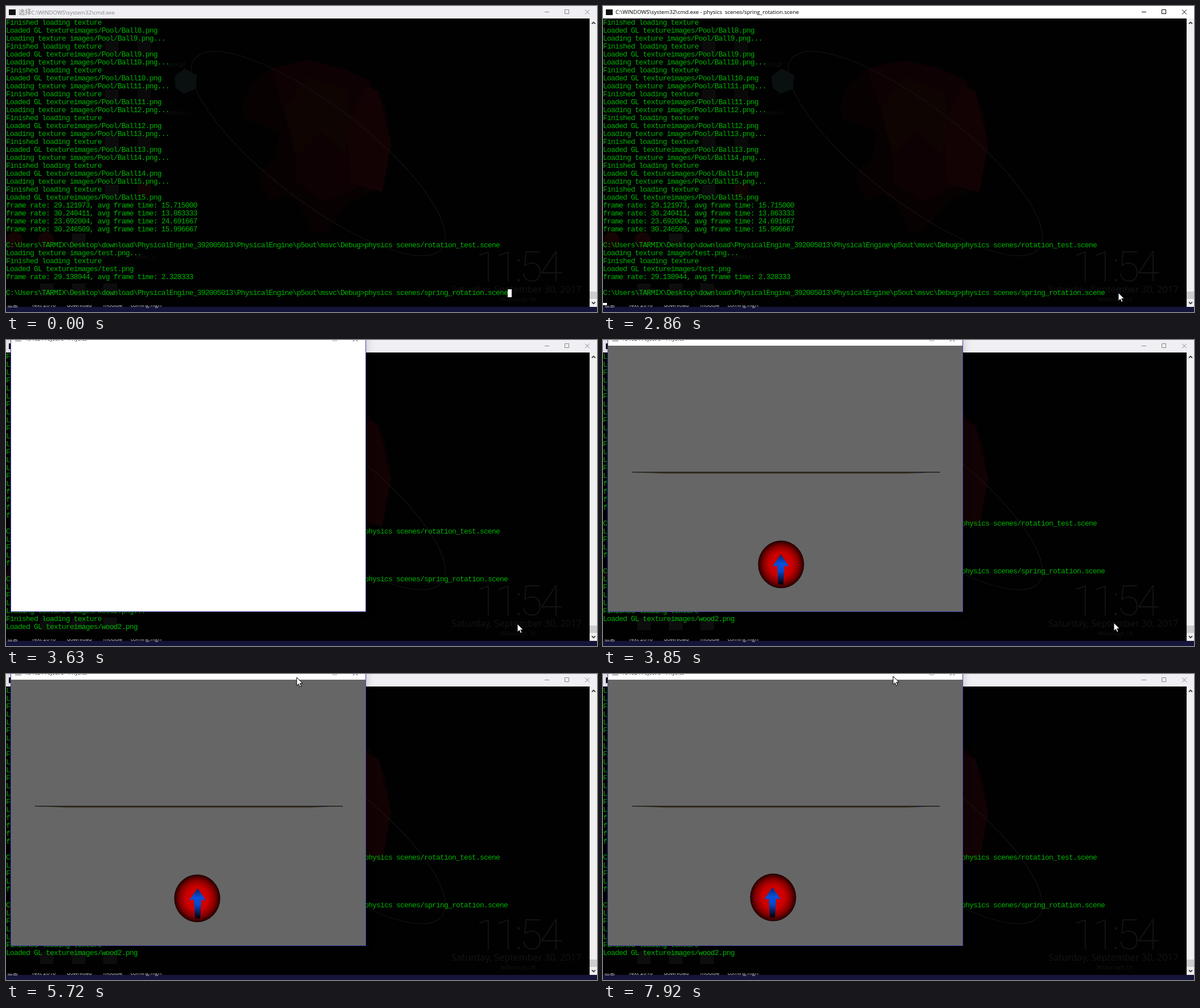
Animation, 1039 px wide and 539 px high, one loop 8 s. Source, as an HTML page:

```html
<!DOCTYPE html>
<html lang="en">
<head>
<meta charset="utf-8">
<title>Terminal and physics window</title>
<style>
  html, body { margin: 0; width: 100%; height: 100%; overflow: hidden; background: #15143a; }
  #stage { position: relative; width: 1039px; height: 539px; overflow: hidden; background: #15143a; }
  #stage > * { position: absolute; }
  svg { display: block; overflow: hidden; }
  #wall { left: 0; top: 22px; background: #010102; }
  #bar { left: 0; top: 0; width: 1039px; height: 22px; background: #f0eff4; color: #858585; }
  #bar.active { background: #fff; color: #000; }
  #bar > * { position: absolute; }
  #icon { left: 5px; top: 6px; width: 12px; height: 10px; background: #111; }
  #title { left: 22px; top: 0; white-space: pre;
    font: 9.6px/22px "Open Sans", "Noto Sans CJK SC", "Noto Sans CJK", sans-serif; }
  #title b { font-weight: 400; font-size: 11.3px; }
  #text { left: 0; top: 23px; margin: 0; width: 1026px; height: 504px; overflow: hidden; color: #00b400;
    font: 13px/14px "Liberation Mono", monospace; letter-spacing: calc(7px - 1ch); }
  #caret, #mark { background: #fff; width: 7px; }
  #caret { height: 4px; }
  #mark { left: 882px; top: 499px; height: 14px; }
  #labels { left: 0; top: 527px; width: 400px; height: 8px; overflow: hidden; color: #d8d8dc;
    font: 9.5px/12px "Open Sans", "Noto Sans CJK SC", "Noto Sans CJK", sans-serif; }
  #labels span { position: absolute; top: -6px; white-space: pre; }
  #win { left: 8px; top: -14px; width: 623px; height: 491px; border: 1px solid #4545a8;
    background: #fff; box-shadow: 0 0 14px rgba(0, 0, 0, .22); }
  #win > * { position: absolute; }
  #name { left: 24px; top: 3px; color: #222; white-space: pre; font: 9.6px/16px "Open Sans", sans-serif; }
  #view { left: 0; top: 23px; background: #666; }
</style>
</head>
<body>
<div id="stage">
  <svg id="wall" width="1026" height="508" viewBox="0 22 1026 508">
    <path fill="#080102" d="M415 178 430 140 465 110 530 95 592 110 640 132 668 180 677 245 665 318 606 345 562 398 540 400 515 350 490 330 465 346 440 300 472 270 482 222 422 200Z"/>
    <path fill="#0d0103" d="M465 110 530 95 592 110 640 132 632 312 560 345 510 310 510 264 488 182Z"/>
    <path fill="#130204" d="M632 140 655 150 677 245 661 328 606 312 598 210Z"/>
    <path fill="#0e0402" d="M488 182 530 125 600 150 606 205 596 262 553 222 510 264Z"/>
    <ellipse cx="549" cy="260" rx="274" ry="85" transform="rotate(37.5 549 260)" fill="none" stroke="#161616"/>
    <g id="deskIcons"></g>
    <path fill="#0a0f10" d="M296 124 314 110 336 122 334 146 312 155 298 144Z"/>
    <g fill="#141414" font-family="Open Sans, sans-serif">
      <text x="825" y="485" font-family="Roboto, sans-serif" font-weight="200" font-size="74" letter-spacing="-5.5">11:54</text>
      <text x="783" y="505" font-size="16.4">Saturday, September 30, 2017</text>
      <text x="869" y="520" font-size="8.4">Millborough, UK</text>
      <text x="284" y="106" font-size="9">pool.gif</text>
      <text x="278" y="191" font-size="9">rotation_t...</text>
      <text x="228" y="445" font-size="9">tonics_c...</text>
    </g>
  </svg>
  <div id="labels"></div>
  <pre id="text"></pre>
  <div id="mark"></div>
  <div id="caret"></div>
  <svg style="left:1026px;top:22px" width="13" height="508" viewBox="-1 -1 13 508">
    <path fill="#f0f0f0" d="M-1-1h13v508H-1z"/>
    <path fill="#cdcdcd" d="M-1 480h13v13H-1z"/>
    <path fill="none" stroke="#404040" stroke-width="1.8" d="M3 8.500 6 5.500 9 8.500M3 498.500 6 501.500 9 498.500"/>
  </svg>
  <div id="bar">
    <div id="icon"></div>
    <div id="title"></div>
    <svg style="left:940px;top:0" width="99" height="22" fill="none" stroke="currentColor">
      <path d="M7 10.500h8M42.500 6.500h7v7h-7zM78 6.500l8 8M86 6.500l-8 8"/>
    </svg>
  </div>
  <div id="win">
    <svg style="left:0;top:0" width="623" height="23">
      <path fill="#c4c4c8" d="M7 6h11v10H7z"/>
      <path fill="none" stroke="#aaa" d="M565.500 8.500h7v6h-7z"/>
      <path stroke="#222" d="M601 7.500l8 8M609 7.500l-8 8"/>
    </svg>
    <div id="name">15462 Project 5 - Physics</div>
    <svg id="view" width="623" height="468" viewBox="9 10 623 468">
      <defs>
        <radialGradient id="red">
          <stop offset="0" stop-color="#d60000"/><stop offset=".5" stop-color="#cc0000"/>
          <stop offset=".78" stop-color="#840000"/><stop offset="1" stop-color="#260000"/>
        </radialGradient>
        <linearGradient id="blue" x2="0" y2="1">
          <stop offset="0" stop-color="#08245f"/><stop offset=".32" stop-color="#0650dc"/>
          <stop offset=".55" stop-color="#0648cc"/><stop offset=".95" stop-color="#000412"/>
        </linearGradient>
      </defs>
      <path fill="#39321f" d="M51 232.500 592 232.500 592 233.400 573 233.400 536 235.300 107 235.300 70 233.800 51 233.300Z"/>
      <path stroke="#14141c" d="M51 232.800H592"/>
      <path stroke="#101850" d="M554 233h10"/>
      <g id="ball">
        <ellipse rx="40" ry="41.500" fill="url(#red)" stroke="#180000"/>
        <path id="arrow" fill="url(#blue)" d="M0-18 14.500 3.500 6.500 2 4.500 35.500-4.500 35.500-6.500 2-14.500 3.500Z"/>
      </g>
    </svg>
  </div>
  <svg id="mouse" style="left:0;top:0" width="13" height="19" viewBox="-1 -1 13 19">
    <path d="M0 0V14.500L3.400 11.400 5.600 16.500 8 15.500 5.800 10.400H10.300Z"/>
  </svg>
</div>
<script>
const $ = id => document.getElementById(id);
const LOOP = 8000, STEP = 110;

const load = f => [`Loading texture images/${f}...`, "Finished loading texture", `Loaded GL textureimages/${f}`];
const rate = (fps, ms) => `frame rate: ${fps}, avg frame time: ${ms}`;
const run = s => "C:\\Users\\TARMIX\\Desktop\\download\\PhysicalEngine_392005013\\PhysicalEngine\\p5out\\msvc\\Debug>physics scenes/" + s + ".scene";

const lines = load("Pool/Ball8.png").slice(1);
for (let i = 9; i <= 15; i++) lines.push(...load(`Pool/Ball${i}.png`));
lines.push(
  rate("29.121973", "15.715000"), rate("30.240411", "13.863333"),
  rate("23.692004", "24.691667"), rate("30.246509", "15.996667"), "",
  run("rotation_test"), ...load("test.png"), rate("29.138944", "2.328333"), "",
  run("spring_rotation"), ...load("wood1.png"), ...load("wood2.png"), "");

// dim desktop icons behind the translucent terminal
const icon = (x, y, color) => `<rect x="${x - 12}" y="${y - 11}" width="24" height="22" fill="${color}"/>`;
let icons = "";
for (const y of [72, 158, 240, 325]) icons += icon(186, y, "#0b0b0c") + icon(243, y, "#090909");
for (const x of [72, 128, 183]) icons += icon(x, 500, "#0c0d0c");
for (const x of [15, 70]) icons += `<circle cx="${x}" cy="412" r="14" fill="#150403"/>`;
$("deskIcons").innerHTML = icons + icon(128, 412, "#0e0e0e") + icon(243, 325, "#120303");
$("labels").innerHTML = [[2, "信息"], [45, "Text 2016"], [107, "download"], [171, "moddle"], [219, "coming.high"]]
  .map(([x, s]) => `<span style="left:${x}px">${s}</span>`).join("");

// time, x, y of the pointer tip
const path = [
  [210, 915, 522], [540, 906, 509], [1310, 905, 509], [1630, 905, 506], [1870, 906, 505],
  [2860, 906, 505], [3290, 903, 503], [3630, 899, 500], [3850, 898, 498], [4070, 622, 150],
  [4400, 560, 95], [4730, 535, 66], [4940, 534, 54], [5170, 522, 28], [5390, 514, 12],
  [5720, 511, 6], [5830, 510, 4], [LOOP, 510, 4]];

function pointer(t) {
  const i = Math.max(1, path.findIndex(p => p[0] >= t));
  const [a, b] = [path[i - 1], path[i]];
  const k = Math.max(0, (t - a[0]) / (b[0] - a[0]));
  return [a[1] + (b[1] - a[1]) * k, a[2] + (b[2] - a[2]) * k].map(Math.round);
}

const show = (id, on) => { $(id).style.visibility = on ? "visible" : "hidden"; };
const move = (id, x, y) => { $(id).style.transform = `translate(${x}px,${y}px)`; };
const last = {};
function put(id, key, value) {
  if (last[id] !== value) $(id)[key] = last[id] = value;
}

function draw(t) {
  const q = Math.floor(t / STEP) * STEP;
  const opened = t >= 2950, entered = t >= 2615;

  const top = t < 3285 ? 0 : t < 3505 ? 3 : t < 3845 ? 6 : 7;
  put("text", "textContent", lines.slice(top, 35 + top).join("\n"));

  put("bar", "className", t >= 100 && !opened ? "active" : "");
  put("title", "innerHTML", (t < 1870 ? "<b>选择</b>" : "") + "C:\\WINDOWS\\system32\\cmd.exe" +
    (entered ? " - physics  scenes/spring_rotation.scene" : ""));

  show("mark", t < 100);
  const blink = Math.floor((t - 540) / 547) % 2 === 0;
  show("caret", t >= 540 && !opened && (entered || blink));
  move("caret", entered ? 0 : 742, entered ? 523 : 509);

  show("win", opened);
  const live = t >= 3845;
  show("view", opened && live);

  const x = 321.5 - 22.5 * Math.cos(2 * Math.PI * (q - 4490) / 3390);
  const y = 395.7 - 0.0035 * (x - 324) ** 2;
  $("ball").setAttribute("transform", `translate(${x.toFixed(2)} ${y.toFixed(2)})`);
  $("arrow").setAttribute("transform", `translate(${((x - 323) * 0.05).toFixed(2)} 0)`);

  const [mx, my] = pointer(q);
  const dark = live && mx < 632 && my > 10;
  show("mouse", t >= 210);
  move("mouse", mx - 1, my - 1);
  $("mouse").style.fill = dark ? "#000" : "#fff";
  $("mouse").style.stroke = dark ? "#eee" : "#000";
}

const start = performance.now();
function tick() {
  draw((performance.now() - start) % LOOP);
  requestAnimationFrame(tick);
}
tick();
</script>
</body>
</html>
```
